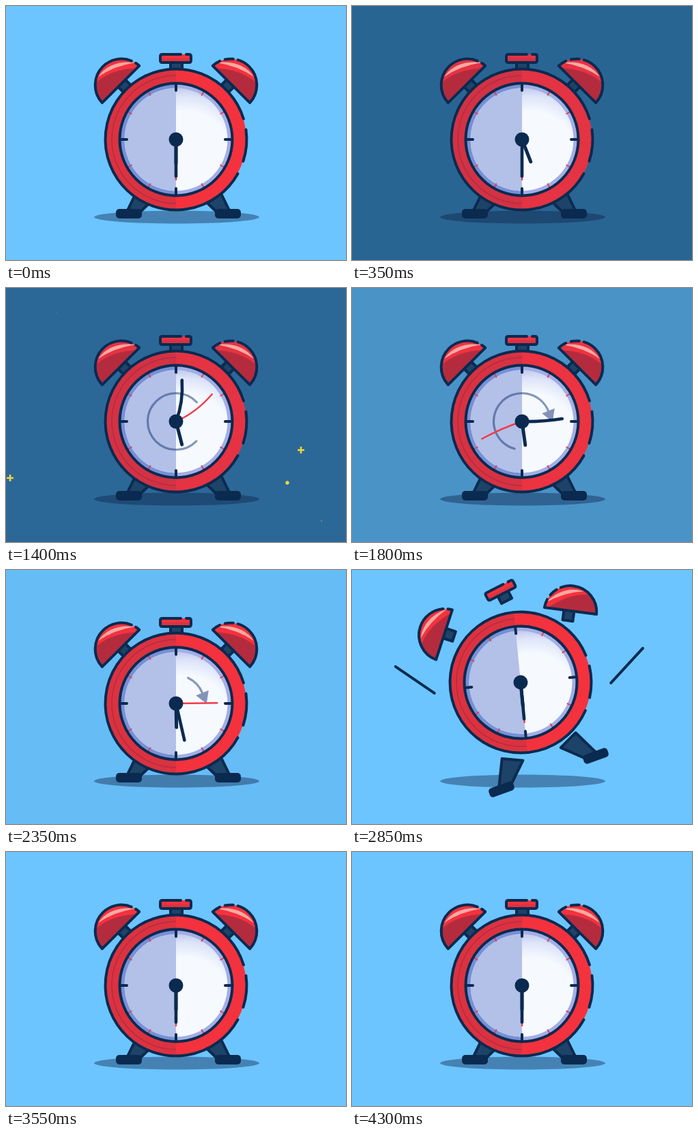
Animation of 498 by 373 pixels, one loop 4350 ms. Source, as an HTML page:

```html
<!DOCTYPE html>
<html lang="en">
<head>
<meta charset="utf-8">
<title>Alarm clock</title>
<style>
  html, body { margin: 0; width: 100%; height: 100%; overflow: hidden; background: #6cc5ff; }
  svg { display: block; width: 100%; height: 100%; }
  .line { stroke: #0a2a50; stroke-width: 4; stroke-linecap: round; stroke-linejoin: round; }
  .none { fill: none; }
  .steel { fill: #1d4468; }
  .red { fill: var(--red); }
  .deep { fill: var(--deep); }
</style>
</head>
<body>
<svg id="stage" viewBox="0 0 498 373" preserveAspectRatio="none">
  <defs>
    <radialGradient id="glow" gradientUnits="userSpaceOnUse" cx="262" cy="222" r="112">
      <stop offset=".6" stop-color="#f6faff"/>
      <stop offset=".8" stop-color="#dde4f8"/>
      <stop offset="1" stop-color="#aab4e6"/>
    </radialGradient>
    <clipPath id="dome"><path d="M140.8 142.2A38.5 38.5 0 0 1 195.2 87.8Z"/></clipPath>
  </defs>
  <g id="stars"></g>
  <ellipse cx="250" cy="310" rx="121" ry="9.5" fill="#0a1c42" fill-opacity=".4"/>
  <g id="rays" class="line"><line/><line/></g>
  <g id="legL"></g>
  <g id="legR"></g>
  <g id="bellL"></g>
  <g id="bellR"></g>
  <g id="cap">
    <rect class="line steel" x="241" y="80" width="17" height="15"/>
    <rect class="red" x="226" y="71" width="45" height="12" rx="3"/>
    <path class="deep" d="M228 77H269V83H228Z"/>
    <path class="line none" d="M264 71H268Q271 71 271 74V80Q271 83 268 83H229Q226 83 226 80V74Q226 71 229 71H256"/>
  </g>
  <g id="body">
    <circle class="red" cx="249" cy="196" r="103"/>
    <path class="deep" d="M249 93A103 103 0 0 0 249 299Z"/>
    <path class="none" d="M249 102A94 94 0 0 0 249 290" stroke="#a92b40" stroke-width="1.6" opacity=".75"/>
    <g id="rim" class="line none"></g>
    <circle cx="249" cy="196" r="82" fill="#a3aee6"/>
    <path d="M249 114A82 82 0 0 0 249 278Z" fill="#7590d6"/>
    <circle cx="249" cy="196" r="75.5" fill="url(#glow)"/>
    <path d="M249 120.5A75.5 75.5 0 0 0 249 271.5Z" fill="#b3c0e8"/>
    <g id="ticks"></g>
    <circle class="line none" cx="249" cy="196" r="82.5"/>
    <path id="arc" class="none" stroke="#173570" stroke-opacity=".5" stroke-width="3.2" stroke-linecap="round"/>
    <path id="head" d="M-10 0L10 0L0 17Z" fill="#8393b8"/>
    <path id="second" class="none" stroke="#f23a47" stroke-width="2.4"/>
    <path id="hour" class="line none" style="stroke-width:5"/>
    <path id="minute" class="line none" style="stroke-width:4.6"/>
    <circle cx="249" cy="196" r="10.5" fill="#0a2a50"/>
  </g>
</svg>
<script>
const LOOP = 4350, CX = 249, CY = 196;
const $ = id => document.getElementById(id);
const set = (el, attrs) => { for (const k in attrs) el.setAttribute(k, attrs[k]); };
const n = v => v.toFixed(2);

// Point at a clock angle (0 is twelve, clockwise)
function polar(deg, r) {
  const a = deg * Math.PI / 180;
  return [CX + r * Math.sin(a), CY - r * Math.cos(a)];
}
const at = (deg, r) => polar(deg, r).map(n).join(' ');

function arcPath(from, to, r) {
  const big = to - from > 180 ? 1 : 0;
  return `M${at(from, r)}A${r} ${r} 0 ${big} 1 ${at(to, r)}`;
}

// Smooth track through [time, value] keys, without overshoot
function track(...keys) {
  const last = keys.length - 1;
  const slope = keys.slice(1).map((k, i) => (k[1] - keys[i][1]) / (k[0] - keys[i][0]));
  const tan = keys.map((k, i) => {
    const a = slope[i - 1], b = slope[i];
    return i && i < last && a * b > 0 ? 2 * a * b / (a + b) : 0;
  });
  return t => {
    if (t <= keys[0][0]) return keys[0][1];
    if (t >= keys[last][0]) return keys[last][1];
    let i = 0;
    while (t > keys[i + 1][0]) i++;
    const [t0, v0] = keys[i], [t1, v1] = keys[i + 1];
    const h = t1 - t0, u = (t - t0) / h, w = 1 - u;
    return v0 * (1 + 2 * u) * w * w + tan[i] * h * u * w * w
         + v1 * u * u * (3 - 2 * u) - tan[i + 1] * h * u * u * w;
  };
}

const mix = (a, b, k) => `rgb(${a.map((v, i) => Math.round(v + (b[i] - v) * k))})`;

// Static parts
const bell = dash => `
  <rect class="line steel" x="167" y="111" width="15" height="15" transform="rotate(45 174.5 118.5)"/>
  <g clip-path="url(#dome)">
    <rect class="red" x="120" y="70" width="80" height="80"/>
    <path d="M126 119Q148 92 198 91V150H126Z" fill="#b52b3e"/>
    <path d="M135 104Q152 79 190 83Q158 88 135 104Z" fill="#fba8a2"/>
  </g>
  <path class="line none" d="M140.8 142.2A38.5 38.5 0 0 1 195.2 87.8Z" stroke-dasharray="${dash}"/>`;
const leg = `
  <path class="line steel" d="M196 263L224 276L197 302L178 300Z"/>
  <rect class="line" x="163" y="300" width="34" height="10" rx="3" fill="#0a2a50"/>`;
$('bellL').innerHTML = bell('104 7 87 0');
$('bellR').innerHTML = `<g transform="matrix(-1 0 0 1 498 0)">${bell('78 7 12 8 93 0')}</g>`;
$('legL').innerHTML = leg;
$('legR').innerHTML = `<g transform="matrix(-1 0 0 1 505 0)">${leg}</g>`;
$('rim').innerHTML = [[119, 433], [82, 108]]
  .map(([a, b]) => `<path d="${arcPath(a, b, 103.5)}"/>`).join('');

let marks = '';
for (let i = 0; i < 12; i++) {
  const a = i * 30;
  marks += i % 3
    ? `<path d="M${at(a, 81)}L${at(a, 74.5)}" stroke="#e0405c" stroke-width="2"/>`
    : `<path class="line" d="M${at(a, 80)}L${at(a, 72)}"/>`;
}
$('ticks').innerHTML = marks;

// x, y, dot radius (0 is a plus), time it vanishes
const stars = [
  [74, 36, 0, 1430], [406, 37, 0, 1320], [432, 238, 0, 1640], [6, 279, 0, 1680], [462, 342, 0, 1440],
  [485, 43, 2.7, 1300], [438, 105, 2.7, 1340], [45, 114, 2.7, 1280], [74, 185, 2.7, 1360],
  [412, 286, 2.7, 1600], [2, 41, 1.9, 1250], [65, 310, 1.9, 1220]
].map(([x, y, r, end], i) => {
  const el = document.createElementNS('http://www.w3.org/2000/svg', 'g');
  el.innerHTML = r
    ? `<circle r="${r}" fill="#f6d43a"/>`
    : '<path d="M-5 0H5M0-5V5" stroke="#f6d43a" stroke-width="2.5"/>';
  $('stars').append(el);
  const start = 330 + i * 67 % 220;
  return { el, x, y, size: track([start, 0], [start + 170, 1], [end - 150, 1], [end, 0]) };
});

// Motion
const night = track([50, 0], [550, 1], [1050, 1], [1400, .63], [2350, .06], [2650, 0]);
const minute = track([500, 180], [800, 244], [1400, 368], [2350, 527], [2600, 540]);
const second = track([500, 180], [800, 274], [1400, 772], [2350, 1169], [2680, 1260]);
const rewind = track([80, 30], [500, 0]);
const bend = track([500, 0], [800, 28], [1400, 13], [2300, 0]);
const stretch = track([500, 0], [800, 1], [1400, .8], [2350, .15], [2600, 0]);
const arcEnd = track([550, 134], [800, 240], [1400, 407], [1750, 428]);
const arcStart = track([1450, 134], [2350, 385], [2500, 428]);
const headSize = track([1450, 0], [1700, 1], [2360, 1], [2520, 0]);
const swing = track([2700, 0], [2850, 1], [3050, 0], [3350, 0]);
const counter = track([2860, 0], [3050, .85], [3320, 0]);
const rayHead = track([2740, -20], [2850, 69], [2960, 98]);
const rayTail = track([2740, -20], [2850, 0], [3010, 98]);

// Leap offsets: dx, dy, turn; then pivot and the mirrored partner
const parts = {
  body:  { leap: [-2, -31, -5.5], pivot: [249, 196], twin: 'body' },
  cap:   { leap: [-31, -47, -27], pivot: [248, 77], twin: 'cap' },
  bellL: { leap: [-33, -20, -27], pivot: [168, 115], twin: 'bellR' },
  bellR: { leap: [-10, -55, -37.5], pivot: [330, 115], twin: 'bellL' },
  legL:  { leap: [39, 17, -20], pivot: [180, 305], twin: 'legR' },
  legR:  { leap: [32, -32, -20], pivot: [325, 305], twin: 'legL' }
};
const rays = [[121, 181, -.825, -.565], [379, 166, .677, -.736]];

function hand(id, angle, length, curve) {
  set($(id), { d: `M${CX} ${CY}Q${at(angle + curve, length / 2)} ${at(angle, length)}` });
}

function draw(t) {
  const dark = night(t);
  document.body.style.background = mix([108, 197, 255], [5, 49, 89], dark);
  $('stage').style.setProperty('--red', mix([244, 50, 62], [220, 52, 70], dark));
  $('stage').style.setProperty('--deep', mix([220, 50, 64], [205, 50, 70], dark));

  for (const s of stars) set(s.el, { transform: `translate(${s.x} ${s.y}) scale(${n(s.size(t))})` });

  const m = minute(t), long = stretch(t) * 9, curve = bend(t);
  hand('minute', m, 54 + long, curve);
  hand('second', second(t), 60 + long, curve);
  hand('hour', 150 + (m - 180) / 12 + rewind(t), 35, 0);

  const from = arcStart(t), to = arcEnd(t), size = headSize(t);
  set($('arc'), { d: to - from > .5 ? arcPath(from, to, 41.5) : '' });
  set($('head'), { transform: `translate(${at(to, 41.5)}) rotate(${n(to - 90)}) scale(${n(size)})` });

  const a = swing(t), b = counter(t);
  for (const id in parts) {
    const { leap, pivot, twin } = parts[id], other = parts[twin].leap;
    const dx = a * leap[0] - b * other[0];
    const dy = a * leap[1] + b * other[1];
    const turn = a * leap[2] - b * other[2];
    set($(id), { transform: `translate(${n(dx)} ${n(dy)}) rotate(${n(turn)} ${pivot})` });
  }

  const p = rayTail(t), q = rayHead(t);
  $('rays').style.display = q - p > 1 ? '' : 'none';
  rays.forEach(([x, y, ux, uy], i) => set($('rays').children[i], {
    x1: n(x + ux * p), y1: n(y + uy * p), x2: n(x + ux * q), y2: n(y + uy * q)
  }));
}

const began = performance.now();
function frame() {
  draw((performance.now() - began) % LOOP);
  requestAnimationFrame(frame);
}
frame();
</script>
</body>
</html>
```
